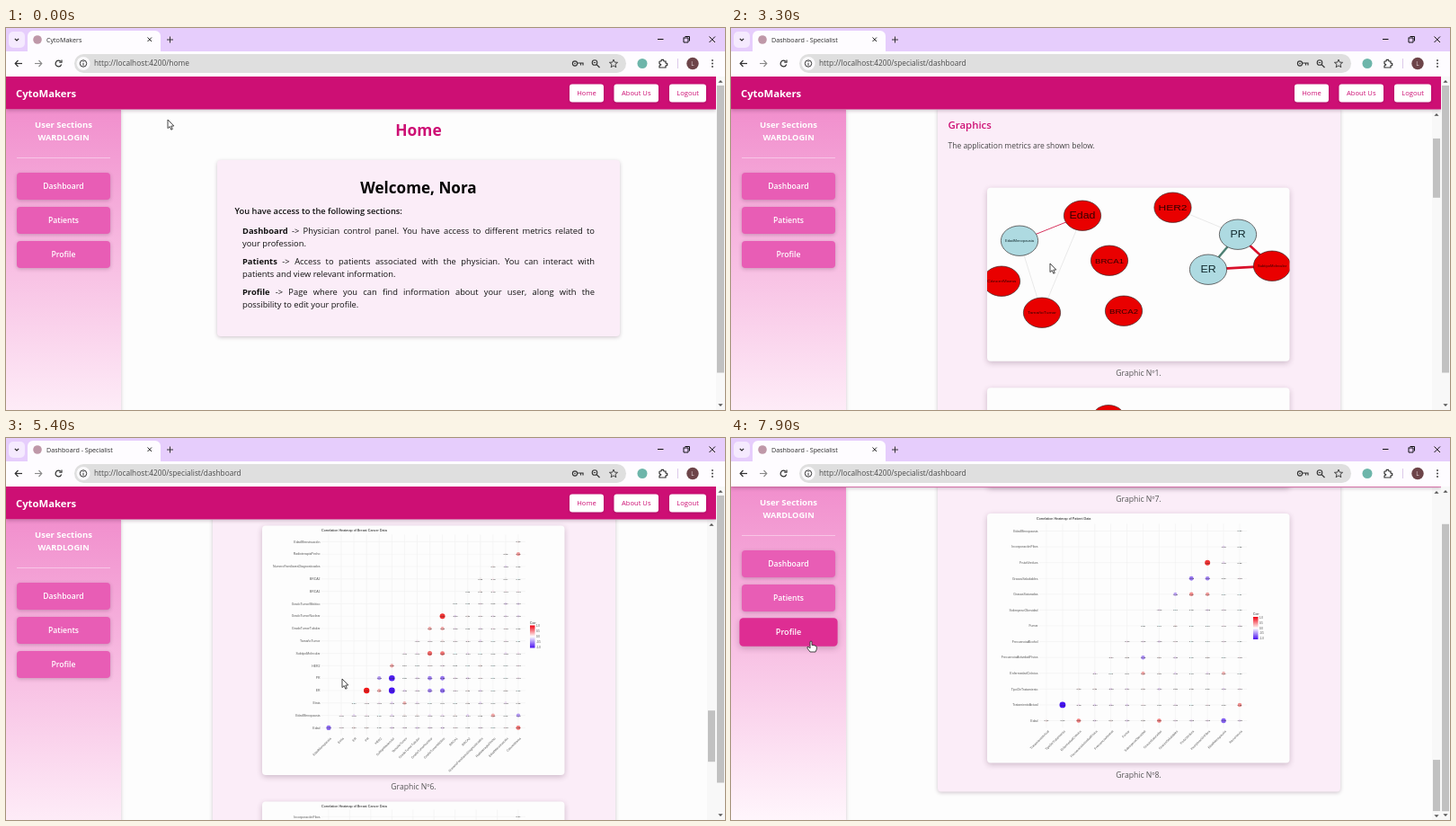
These frames come from a looping animation (800x425 px, 8000 ms). An HTML page with a canvas:

```html
<!DOCTYPE html>
<html lang="en">
<head>
<meta charset="utf-8">
<title>Dashboard</title>
<style>
html, body { margin: 0; width: 100%; height: 100%; overflow: hidden; background: #fdfdfd; }
canvas { display: block; width: 800px; height: 425px; }
</style>
</head>
<body>
<canvas id="stage" width="800" height="425"></canvas>
<script>
const ctx = document.getElementById('stage').getContext('2d');
const LOOP = 8000, NAV_AT = 2300;
const UI = '"Open Sans", "Noto Sans", sans-serif';
const PLOT = '"Liberation Sans", Arial, sans-serif';
const MAGENTA = '#cd0f74', PANEL = '#fbedf8', RED = '#e90000', BLUE = '#aedae1';
const TOP = 54, BODY = 91, VIEW = 371;

// Piecewise linear value over time; keys are [time, value, ...]
function track(keys, t, i = 1) {
  if (t <= keys[0][0]) return keys[0][i];
  for (let k = 1; k < keys.length; k++) {
    const a = keys[k - 1], b = keys[k];
    if (t <= b[0]) return a[i] + (b[i] - a[i]) * (t - a[0]) / (b[0] - a[0]);
  }
  return keys[keys.length - 1][i];
}
const clamp = v => Math.max(0, Math.min(1, v));
const smooth = v => { v = clamp(v); return v * v * (3 - 2 * v); };
const noise = n => { const s = Math.sin(n * 12.9898) * 43758.5453; return s - Math.floor(s); };

const pointer = [[100, 180, 102], [600, 92, 174], [950, 90, 178], [1250, 90, 214], [1550, 90, 250],
  [1750, 90, 250], [2050, 88, 178], [2280, 88, 178], [2650, 355, 257], [3300, 355, 262],
  [4100, 354, 274], [4700, 370, 273], [5400, 374, 268], [6800, 382, 264], [7200, 382, 264],
  [7700, 92, 228], [7900, 89, 226]];
const scrollKeys = [[3000, 0], [3150, 40], [4100, 564], [4700, 895.5], [5400, 1315.5], [6350, 1880], [6500, 1907.5]];
const hovers = [[0, 520, 1120], [1, 1120, 1410], [2, 1410, 1860], [1, 1860, 1960], [0, 1960, 2370], [2, 7670, 8200]];

function text(s, x, y, size, color = '#111', weight = 400, align = 'left', family = UI) {
  ctx.font = `${weight} ${size}px ${family}`;
  ctx.textAlign = align;
  ctx.fillStyle = color;
  ctx.fillText(s, x, y + size * 0.36);
}
function box(x, y, w, h, r, color, shadow = 0) {
  ctx.save();
  if (shadow) {
    ctx.shadowColor = 'rgba(60,20,50,.24)';
    ctx.shadowBlur = shadow;
    ctx.shadowOffsetY = shadow / 3;
  }
  ctx.fillStyle = color;
  ctx.beginPath();
  ctx.roundRect(x, y, w, h, r);
  ctx.fill();
  ctx.restore();
}
function dot(x, y, r, color) {
  ctx.fillStyle = color;
  ctx.beginPath();
  ctx.arc(x, y, r, 0, 7);
  ctx.fill();
}
function line(color, width, ...p) {
  ctx.strokeStyle = color;
  ctx.lineWidth = width;
  ctx.beginPath();
  for (let i = 0; i < p.length; i += 2) ctx.lineTo(p[i], p[i + 1]);
  ctx.stroke();
}
function ring(x, y, r, color, width = 1, from = 0, to = 7) {
  ctx.strokeStyle = color;
  ctx.lineWidth = width;
  ctx.beginPath();
  ctx.arc(x, y, r, from, to);
  ctx.stroke();
}
function clipTo(x, y, w, h) {
  ctx.beginPath();
  ctx.rect(x, y, w, h);
  ctx.clip();
}

function browser(home) {
  const ink = '#333';
  box(0, 0, 800, 30, 0, '#e6cdfc');
  box(3, 4, 18, 18, 5, '#f5eafe');
  line('#222', 1.1, 9.8, 11.8, 12, 14, 14.2, 11.8);
  box(24, 3, 148, 30, [6, 6, 0, 0], '#fefcff');
  dot(35, 13, 4.8, '#bf98a8');
  text(home ? 'CytoMakers' : 'Dashboard - Specialist', 45, 13, 7.15, '#2b2b2b');
  line('#222', 1, 157.5, 10.5, 162, 15);
  line('#222', 1, 162, 10.5, 157.5, 15);
  line('#333', 1, 179, 13, 186, 13);
  line('#333', 1, 182.5, 9.5, 182.5, 16.5);
  line('#111', 1, 725, 12.5, 731.5, 12.5);
  line('#111', 1, 754, 11, 759, 11, 759, 16, 754, 16, 754, 10.5);
  line('#111', 1, 755.5, 9.5, 760.5, 9.5, 760.5, 14.5);
  line('#111', 1, 782.5, 9.5, 789, 16);
  line('#111', 1, 789, 9.5, 782.5, 16);

  box(0, 26, 800, 28, 0, '#fefcff');
  line(ink, 1.2, 18, 39.5, 10.5, 39.5);
  line(ink, 1.2, 13.5, 36, 10.2, 39.5, 13.5, 43);
  line('#8a8a8a', 1.1, 32, 39.5, 39.5, 39.5);
  line('#8a8a8a', 1.1, 36.5, 36, 39.8, 39.5, 36.5, 43);
  ring(58.5, 39.5, 3.3, ink, 1.2, 0.3, 5.5);
  line(ink, 1.2, 62, 35.5, 62, 38.2, 59.2, 38.2);
  box(76, 29, 614, 21, 10.5, '#dfdfdf');
  dot(86, 39.5, 7.5, '#fbfafc');
  ring(86, 39.5, 3.7, ink, 1);
  line(ink, 1, 86, 39, 86, 41.7);
  line(ink, 1, 86, 37.2, 86, 38.1);
  text('http://localhost:4200/' + (home ? 'home' : 'specialist/dashboard'), 98, 39.5, 8.3, '#4c4c4c');
  ring(633, 39.5, 2.6, ink, 1.1);
  dot(633, 39.5, 0.8, ink);
  line(ink, 1.2, 635.5, 39, 642, 39, 642, 41.5);
  line(ink, 1, 639.5, 39, 639.5, 41.5);
  ring(655, 38.5, 2.8, ink, 1.1);
  line(ink, 1.2, 657.2, 40.6, 660.5, 44);
  line(ink, 0.9, 653.7, 38.5, 656.3, 38.5);
  ctx.beginPath();
  for (let i = 0; i < 10; i++) {
    const a = i * Math.PI / 5 - Math.PI / 2, r = i % 2 ? 2.1 : 4.8;
    ctx.lineTo(676 + r * Math.cos(a), 39.8 + r * Math.sin(a));
  }
  ctx.closePath();
  ctx.strokeStyle = ink;
  ctx.lineWidth = 0.9;
  ctx.stroke();
  dot(708, 39.5, 5.5, '#6db5aa');
  line(ink, 1.2, 727, 37, 729, 37, 729.3, 35.3, 731.5, 35.3, 732, 37, 734, 37, 734, 39, 735.7, 39.5, 735.7, 41.5,
    734, 42, 734, 44, 727, 44, 727, 42, 728.7, 41, 727, 39.5, 727, 37);
  line('#dcc9ea', 1, 747.5, 34, 747.5, 45);
  dot(764, 39.5, 6.7, '#6d4449');
  text('L', 764, 39.5, 6.5, '#e9dede', 400, 'center');
  for (const y of [36, 39.5, 43]) dot(786, y, 0.9, ink);
}

function header() {
  box(0, TOP, 790, 36.5, 0, MAGENTA, 4);
  text('CytoMakers', 11, 73, 11.3, '#fff', 700);
  for (const [s, x, w] of [['Home', 627, 38], ['About Us', 676.5, 49.5], ['Logout', 738, 41]]) {
    box(x, 62.5, w, 20, 3, '#fff', 3);
    text(s, x + w / 2, 72.7, 7.6, MAGENTA, 400, 'center');
  }
}

function sidebar(t) {
  const g = ctx.createLinearGradient(0, BODY, 0, BODY + VIEW);
  g.addColorStop(0, '#f18fcd');
  g.addColorStop(1, '#fff6fc');
  box(0, BODY, 128, VIEW, 0, g, 4);
  text('User Sections', 64, 108, 9.5, '#fff', 700, 'center');
  text('WARDLOGIN', 64, 122, 9.2, '#fff', 700, 'center');
  line('rgba(255,255,255,.4)', 1, 12, 144.5, 116, 144.5);
  ['Dashboard', 'Patients', 'Profile'].forEach((s, i) => {
    let h = 0;
    for (const [b, from, to] of hovers) {
      if (b === i) h = Math.max(h, smooth((t - from) / 200) * (1 - smooth((t - to) / 200)));
    }
    const k = 1 + 0.05 * h;
    ctx.save();
    ctx.translate(64, 176 + 38 * i);
    ctx.scale(k, k);
    box(-52, -15, 104, 30, 4, `rgb(${232 - 10 * h},${93 - 48 * h},${181 - 34 * h})`, 4 + 3 * h);
    text(s, 0, 0, 8.6, '#fff', 600, 'center');
    ctx.restore();
  });
}

// One line of a paragraph, optionally with a bold lead and justified
function justify(lead, rest, y, full) {
  const words = rest.split(' ').map(s => [s, 400]);
  if (lead) words.unshift([lead, 700]);
  const widths = words.map(([s, w]) => {
    ctx.font = `${w} 9.35px ${UI}`;
    return ctx.measureText(s).width;
  });
  const sum = widths.reduce((a, b) => a + b, 0);
  const gap = full ? (392 - sum) / (words.length - 1) : 2.43;
  let x = 263;
  words.forEach(([s, w], i) => {
    text(s, x, y, 9.35, '#111', w);
    x += widths[i] + gap;
  });
}

function homePage() {
  text('Home', 459, 114, 17.4, MAGENTA, 700, 'center');
  box(235, 147, 448, 196, 4, PANEL, 4);
  text('Welcome, Nora', 459, 178, 17.1, '#050505', 700, 'center');
  text('You have access to the following sections:', 254.5, 204, 9.3, '#111', 600);
  justify('Dashboard', '-> Physician control panel. You have access to different metrics related to', 226, true);
  justify('', 'your profession.', 240);
  justify('Patients', '-> Access to patients associated with the physician. You can interact with', 260, true);
  justify('', 'patients and view relevant information.', 274);
  justify('Profile', '-> Page where you can find information about your user, along with the', 294, true);
  justify('', 'possibility to edit your profile.', 308);
}

// Nodes: [label, x, y, blue]; edges: [from, to, color, width]
const FAINT = '#e4e4e4', CRIMSON = '#d8345f', GREEN = '#4d7f73';
const receptors = {
  rx: 21,
  nodes: [['Edad', 391, 31], ['EdadMenopausia', 321, 59, 1], ['HER2', 491.5, 22], ['PR', 564, 52, 1],
    ['ER', 531, 91, 1], ['SubtipoMolecular', 602, 87], ['BRCA1', 421, 81], ['CáncerMama', 301, 104],
    ['TamañoTumor', 346, 139], ['BRCA2', 437, 137]],
  edges: [[0, 1, CRIMSON, 1], [0, 8, FAINT, 0.8], [1, 8, FAINT, 0.8], [2, 3, FAINT, 0.8],
    [3, 4, GREEN, 2.5], [3, 5, '#d8102a', 2.5], [4, 5, '#d8102a', 2.8]]
};
const habits = {
  rx: 19.5,
  nodes: [['Edad', 420, 36], ['EnfermedadCrónica', 310, 118], ['EdadMenopausia', 395, 130, 1], ['Fumar', 506, 134, 1],
    ['EdadMenopausia', 583, 137, 1], ['SobrepesoObesidad', 358, 161, 1], ['Lactancia', 444, 159],
    ['GrasasSaturadas', 513, 172], ['FrutaVerdura', 560, 55]],
  edges: [[0, 2, CRIMSON, 1], [7, 8, FAINT, 0.8]]
};
const surgery = {
  rx: 19.5,
  nodes: [['RadioterapiaPecho', 409, 17], ['Edad', 497, 32], ['Biomarcadores', 328, 52], ['EdadMenopausia', 431, 85, 1],
    ['TipoTratamiento', 532, 87], ['TratamientoActual', 589, 65.5], ['EstadoMenstrual', 310.5, 101.5],
    ['EnfermedadCrónica', 588, 129], ['Etnia', 349, 146], ['Recurrencia', 513, 149], ['Operación', 430.5, 171.5, 1]],
  edges: [[1, 3, CRIMSON, 1.1], [0, 1, FAINT, 0.5], [4, 5, '#e00a1c', 3], [5, 9, FAINT, 0.8], [9, 7, '#7d9a94', 1.5]]
};
const therapy = {
  rx: 19.5,
  nodes: [['EdadMenopausia', 425, 17, 1], ['Edad', 497, 38], ['FrutaVerdura', 335, 46], ['Biomarcadores', 411, 64],
    ['FrecuenciaAlcohol', 577, 66.5, 1], ['GrasasSaludables', 504, 80], ['TipoTratamiento', 312, 90],
    ['TratamientoActual', 310, 124.5], ['GrasasSaturadas', 411, 124, 1], ['Enfermedades', 505, 126],
    ['RadioterapiaPecho', 589, 116]],
  edges: [[0, 1, CRIMSON, 1], [3, 1, FAINT, 0.8], [5, 4, '#dccccc', 0.8], [6, 7, '#e00a1c', 3], [8, 9, '#dd9fb0', 1]]
};

function network({ rx, nodes, edges }) {
  for (const [a, b, color, w] of edges) line(color, w, nodes[a][1], nodes[a][2], nodes[b][1], nodes[b][2]);
  for (const [label, x, y, blue] of nodes) {
    ctx.save();
    ctx.translate(x, y);
    ctx.scale(rx / 17, 1);
    dot(0, 0, 16.7, blue ? BLUE : RED);
    ring(0, 0, 16.7, '#332a2a', 0.6);
    ctx.font = `100px ${PLOT}`;
    const size = Math.min(10, 2600 / ctx.measureText(label).width);
    text(label, 0, 0, size, blue ? '#10282c' : '#350000', 400, 'center', PLOT);
    ctx.restore();
  }
}

const lifestyle = ['EnfermedadCrónica', 'FrecuenciaActividadFísica', 'FrecuenciaAlcohol', 'Fumar', 'SobrepesoObesidad',
  'GrasasSaturadas', 'GrasasSaludables', 'FrutaVerdura', 'IncorporaciónFibra'];
// strong: [row, column, correlation], rows counted from the bottom
const tumour = {
  title: 'Breast Cancer', tx: 351, x0: 359, x1: 570, y0: 225, y1: 18, key: [583, 111],
  names: ['Edad', 'EdadMenopausia', 'Etnia', 'ER', 'PR', 'HER2', 'SubtipoMolecular', 'TamañoTumor', 'GradoTumorTubular',
    'GradoTumorNuclear', 'GradoTumorMitótico', 'BRCA1', 'BRCA2', 'NumeroFamiliaresDiagnosticados',
    'RadioterapiaPecho', 'EdadMenstruación', 'CáncerMama'],
  strong: [[3, 3, 0.9], [4, 5, -0.95], [3, 5, -1], [0, 0, -0.6], [3, 4, 0.35], [4, 4, -0.4], [6, 8, 0.6], [6, 9, 0.55],
    [9, 9, 0.8], [8, 8, 0.35], [8, 9, 0.35], [4, 8, -0.5], [4, 9, -0.55], [3, 8, -0.5], [3, 9, -0.6], [14, 15, 0.4],
    [1, 15, -0.4], [0, 15, 0.55], [1, 13, 0.35], [5, 5, 0.35], [2, 6, 0.3]]
};
const risk = {
  title: 'Breast Cancer', tx: 351, x0: 359, x1: 570, y0: 225, y1: 17, key: [583, 111],
  names: ['Edad', ...lifestyle, 'CáncerMama'],
  strong: [[7, 7, -0.5], [8, 8, 0.7], [0, 0, 0.5], [2, 5, -0.4]]
};
const patient = {
  title: 'Patient', tx: 340, x0: 351, x1: 566, y0: 230.5, y1: 19.5, key: [581, 115],
  names: ['Edad', 'TratamientoActual', 'TipoDeTratamiento', ...lifestyle, 'EdadMenopausia', 'Recurrencia'],
  strong: [[1, 1, -1], [10, 10, 0.8], [9, 9, -0.55], [9, 10, -0.5], [8, 8, -0.35], [8, 9, 0.45], [8, 10, 0.4],
    [4, 6, -0.45], [0, 11, -0.65], [0, 2, 0.5], [0, 7, 0.5], [1, 12, 0.45], [3, 6, 0.35], [3, 11, 0.3]]
};

function corrColor(v) {
  const k = Math.round(255 * (1 - Math.abs(v)));
  return v > 0 ? `rgb(238,${k},${k})` : `rgb(${Math.round(70 + k * 0.7)},${Math.round(20 + k * 0.85)},240)`;
}

function heatmap({ title, tx, x0, x1, y0, y1, key, names, strong }) {
  const n = names.length - 1, dx = (x1 - x0) / (n - 1), dy = (y0 - y1) / (n - 1);
  text(`Correlation Heatmap of ${title} Data`, tx, 5.5, 3.75, '#111', 400, 'left', PLOT);
  for (let i = 0; i < n; i++) {
    const x = x0 + i * dx, y = y0 - i * dy;
    line('#f3f3f3', 0.7, x, y1 - 8, x, y0 + 8);
    line('#f3f3f3', 0.7, x0 - 8, y, x1 + 8, y);
    text(names[i], x0 - 9.5, y, 3.5, '#555', 400, 'right', PLOT);
    ctx.save();
    ctx.translate(x + 1.5, y0 + 10.5);
    ctx.rotate(-Math.PI / 4);
    text(names[i + 1], 0, 1, 3.5, '#555', 400, 'right', PLOT);
    ctx.restore();
  }
  for (let r = 0; r < n; r++) {
    for (let c = r; c < n; c++) {
      const hit = strong.find(s => s[0] === r && s[1] === c);
      const v = hit ? hit[2] : (noise(r * 31 + c * 7 + n) - 0.5) * 0.24;
      const x = x0 + c * dx, y = y0 - r * dy;
      dot(x, y, 1.3 + 2.1 * Math.abs(v), corrColor(v));
      text(v.toFixed(2), x, y, 2.5, '#222', 400, 'center', PLOT);
    }
  }
  const [kx, ky] = key, g = ctx.createLinearGradient(0, ky, 0, ky + 25);
  g.addColorStop(0, '#f00010');
  g.addColorStop(0.5, '#fff');
  g.addColorStop(1, '#4a10f0');
  text('Corr', kx, ky - 3, 3.4, '#222', 400, 'left', PLOT);
  box(kx, ky, 5.5, 25, 0, g);
  ['1.0', '0.5', '0.0', '-0.5', '-1.0'].forEach((s, i) =>
    text(s, kx + 7, ky + 0.8 + i * 5.9, 2.7, '#333', 400, 'left', PLOT));
}

const cards = [receptors, habits, surgery, surgery, therapy, tumour, risk, patient];

function dashboardPage(scroll) {
  ctx.save();
  ctx.translate(0, -scroll);
  text('Dashboard', 453.5, 114, 16.9, MAGENTA, 700, 'center');
  box(230, 147, 448, 52, 4, PANEL, 4);
  box(229.5, 147, 2, 52, [3, 0, 0, 3], MAGENTA);
  text('About Dashboard', 239, 161, 7.4, MAGENTA, 700);
  text('This section contains a summary of the application metrics. They show the data obtained since the last update. That is,',
    239, 173, 7.5, MAGENTA);
  text('they are not real time data.', 239, 185, 7.5, MAGENTA);
  box(230, 211, 448, 2126, 4, PANEL, 4);
  text('Graphics', 241.5, 231, 11.4, MAGENTA, 600);
  text('The application metrics are shown below.', 241.5, 254.5, 8.5, '#444');
  let y = 301;
  cards.forEach((card, i) => {
    const h = card.names ? 277.5 : 193;
    if (y + h + 30 > scroll + TOP && y < scroll + 470) {
      box(285, y, 336.5, h, 4, '#fdfdfd', 6);
      ctx.save();
      ctx.translate(0, y);
      clipTo(285, 0, 336.5, h);
      card.names ? heatmap(card) : network(card);
      ctx.restore();
      text(`Graphic Nº${i + 1}.`, 453.5, y + h + 13, 8.6, '#555', 400, 'center');
    }
    y += h + 29.5;
  });
  ctx.restore();
}

function arrow(x, y, dir) {
  ctx.fillStyle = '#555';
  ctx.beginPath();
  ctx.moveTo(x - 2.6, y + 1.3 * dir);
  ctx.lineTo(x + 2.6, y + 1.3 * dir);
  ctx.lineTo(x, y - 1.5 * dir);
  ctx.fill();
}
function scrollbar(x, y, h, pos, len) {
  box(x, y, 10, h, 0, '#f8f8f8');
  arrow(x + 5, y + 5.5, 1);
  arrow(x + 5, y + h - 5.5, -1);
  box(x + 1, pos, 8, len, 0, '#c1c1c1');
}

function outline(points) {
  ctx.beginPath();
  for (let i = 0; i < points.length; i += 2) ctx.lineTo(points[i], points[i + 1]);
  ctx.closePath();
  ctx.fillStyle = '#fff';
  ctx.fill();
  ctx.strokeStyle = '#333';
  ctx.lineWidth = 0.9;
  ctx.lineJoin = 'round';
  ctx.stroke();
}
function cursor(t, offset) {
  const x = track(pointer, t, 1), y = track(pointer, t, 2);
  const row = y + offset - 161;
  const onButton = x > 10 && x < 117 && row > 0 && row < 106 && row % 38 < 31;
  ctx.save();
  ctx.translate(x, y);
  if (onButton) {
    outline([-1, 0.5, 0, 0, 1, 0.5, 1, 4.5, 3, 4.5, 5, 5.2, 6.3, 6.2, 6.3, 9, 5, 12, -1, 12,
      -4, 8, -4, 6.5, -2.7, 6.5, -1, 8]);
  } else if (t > 2500 && t < 3100) {
    line('#222', 1.1, -2.5, -5, 0, -4.5, 2.5, -5);
    line('#222', 1.1, 0, -4.5, 0, 4.5);
    line('#222', 1.1, -2.5, 5, 0, 4.5, 2.5, 5);
  } else {
    outline([0, 0, 0, 9.6, 2.2, 7.6, 3.8, 11.2, 5.3, 10.5, 3.8, 7.1, 6.8, 7]);
  }
  ctx.restore();
}

function draw(t) {
  const home = t < NAV_AT;
  const scroll = track(scrollKeys, t);
  const offset = 36 * smooth((t - 6880) / 220);
  box(0, 0, 800, 425, 0, '#fdfdfd');
  ctx.save();
  clipTo(0, TOP, 800, 371);
  ctx.translate(0, -offset);
  ctx.save();
  clipTo(128, BODY, 662, VIEW);
  if (home) {
    homePage();
  } else {
    dashboardPage(scroll);
    // the page grows as pictures load
    const height = Math.min(2278, 1938 + 0.26 * scroll);
    scrollbar(780, BODY, VIEW, 101 + 350 * scroll / height, 350 * VIEW / height);
  }
  ctx.restore();
  sidebar(t);
  header();
  ctx.restore();
  scrollbar(790, TOP, VIEW, 64 + 0.88 * offset, 319.5);
  browser(home);
  cursor(t, offset);
}

function frame(now) {
  draw(now % LOOP);
  requestAnimationFrame(frame);
}
draw(0);
requestAnimationFrame(frame);
</script>
</body>
</html>
```
